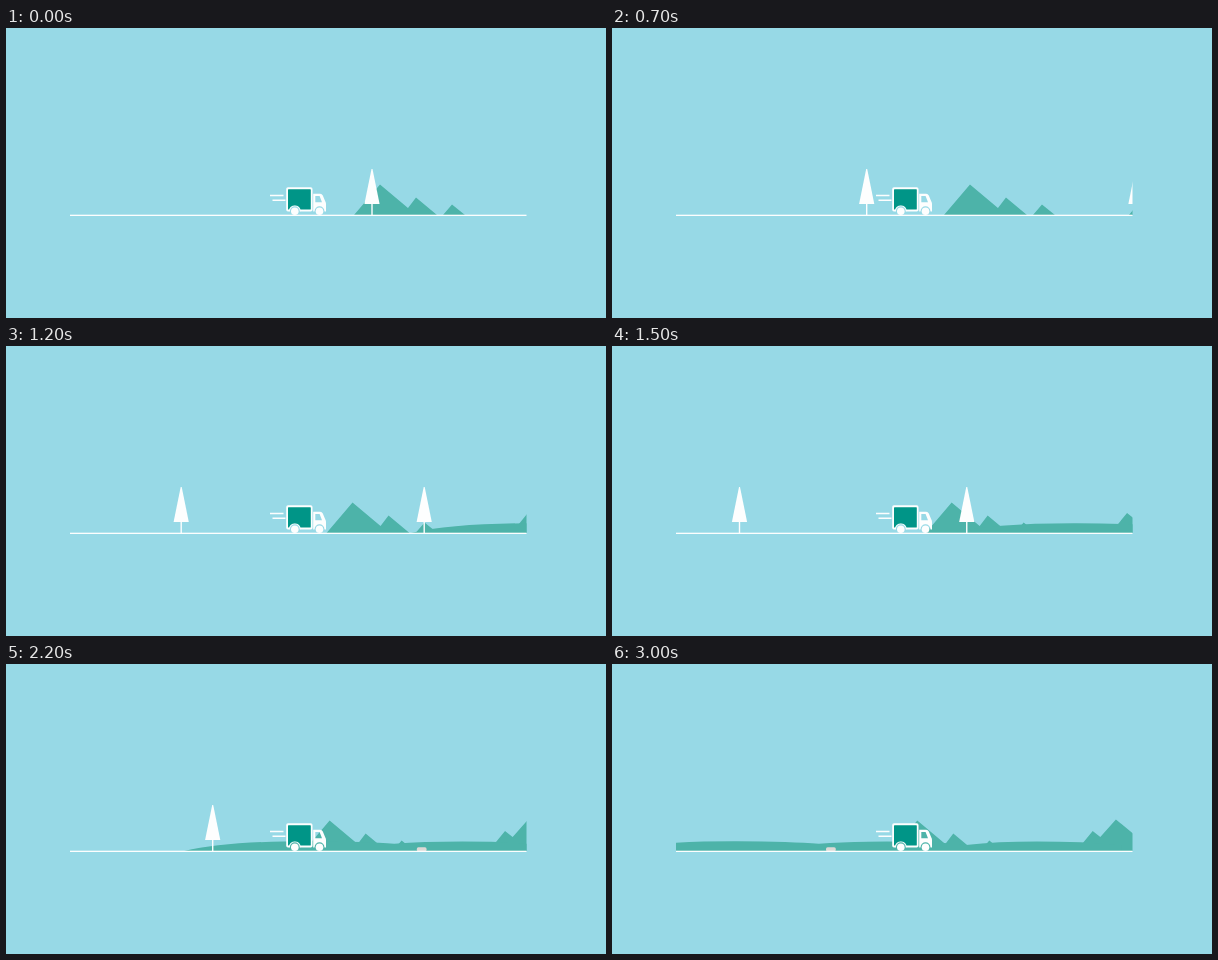
Write an HTML page that moves like this. It is 600 px wide and 290 px high and loops after 3100 ms.

```html
<!DOCTYPE html>
<html lang="en">
<head>
<meta charset="utf-8">
<title>Delivery truck</title>
<style>
  html, body { margin: 0; width: 100%; height: 100%; overflow: hidden; background: #97d9e6; }
  svg { display: block; width: 600px; height: 290px; }
  .land { fill: #4db3a9; }
  .white { fill: #fdfefe; }
  .line { stroke: #fdfefe; stroke-width: 1.4; fill: none; }
  #tip text { font: 5.2px "Open Sans", sans-serif; fill: #e6e6e6; }
</style>
</head>
<body>
<svg viewBox="0 0 600 290">
  <defs>
    <clipPath id="view"><rect x="64" y="100" width="456.5" height="100"/></clipPath>
    <mask id="arches" maskUnits="userSpaceOnUse" x="270" y="150" width="60" height="40">
      <path d="M270 150H330V190H270Z" fill="#fff"/>
      <circle cx="288.8" cy="183.2" r="4.9"/>
      <circle cx="313.5" cy="183.2" r="4.9"/>
    </mask>
    <g id="tree">
      <path class="white" d="M-.5 141H.5L7.6 176H-7.6Z"/>
      <path class="line" d="M0 175V187"/>
    </g>
  </defs>

  <g clip-path="url(#view)">
    <path id="peaks" class="land" d="M-26 187L0 156.5L28 180L36 169.5L57 187Z M63 187L72 176.5L85 187Z
      M159 187L175.4 167L183 173L198.6 155.5L237 187Z"/>
    <path id="hills" class="land" d="M-3 187Q40 177 125 177.2Q180 177.5 207 179.8Q235 177.6 275 177.6
      Q325 177.6 354 181Q385 177.6 425 177.6Q470 177.6 510 181V187Z"/>
    <rect id="rock" x="-5" y="183.3" width="9.8" height="4" rx="1.6" fill="#ddd9d6"/>
    <use id="tree1" href="#tree"/>
    <use id="tree2" href="#tree"/>
  </g>

  <rect class="white" x="64" y="186.7" width="456.5" height="1.3"/>
  <path class="line" d="M264 167.5H277.5M266.5 172.2H279.5"/>

  <g id="truck">
    <g mask="url(#arches)">
      <rect class="white" x="280.2" y="159.3" width="26.3" height="24.2" rx="1.8"/>
      <rect x="282" y="161.2" width="22.8" height="20.4" rx=".6" fill="#009587"/>
      <circle class="white" cx="288.8" cy="183.2" r="6"
        clip-path="inset(0 0 50% 0)"/>
      <path class="white" fill-rule="evenodd" d="M307.2 165.7H314.2Q316 165.7 316.8 167.5L319.2 173.2
        Q320 174.5 320 176V183.6H307.2Z M309.3 168H313.6L316 174.3H309.3Z"/>
    </g>
    <circle class="white" cx="288.8" cy="183.2" r="3.8"/>
    <circle class="white" cx="313.5" cy="183.2" r="3.8"/>
  </g>

  <g id="tip">
    <rect x="574.7" y="274.9" width="26" height="11" fill="#343537"/>
    <text x="577.3" y="282.1">Stop screen</text>
  </g>
</svg>
<script>
  const LOOP = 3100, STEP = 100;
  const get = id => document.getElementById(id);

  // Each layer scrolls left: start x, speed in px per ms
  const layers = [
    { el: get("peaks"), x: 374, speed: 0.0229 },
    { el: get("hills"), x: 680, speed: 0.2267 },
    { el: get("rock"), x: 957, speed: 0.246 },
    { el: get("tree1"), x: 366, speed: 0.159 },
    { el: get("tree2"), x: 672, speed: 0.2115 }
  ];
  const tip = get("tip");

  function draw(now) {
    const t = Math.floor(now % LOOP / STEP) * STEP;
    for (const { el, x, speed } of layers) {
      el.setAttribute("transform", `translate(${(x - speed * t).toFixed(2)} 0)`);
    }
    tip.style.display = t >= 2300 && t < 2800 ? "" : "none";
  }

  const start = performance.now();
  function tick() {
    draw(performance.now() - start);
    requestAnimationFrame(tick);
  }
  tick();
</script>
</body>
</html>
```
